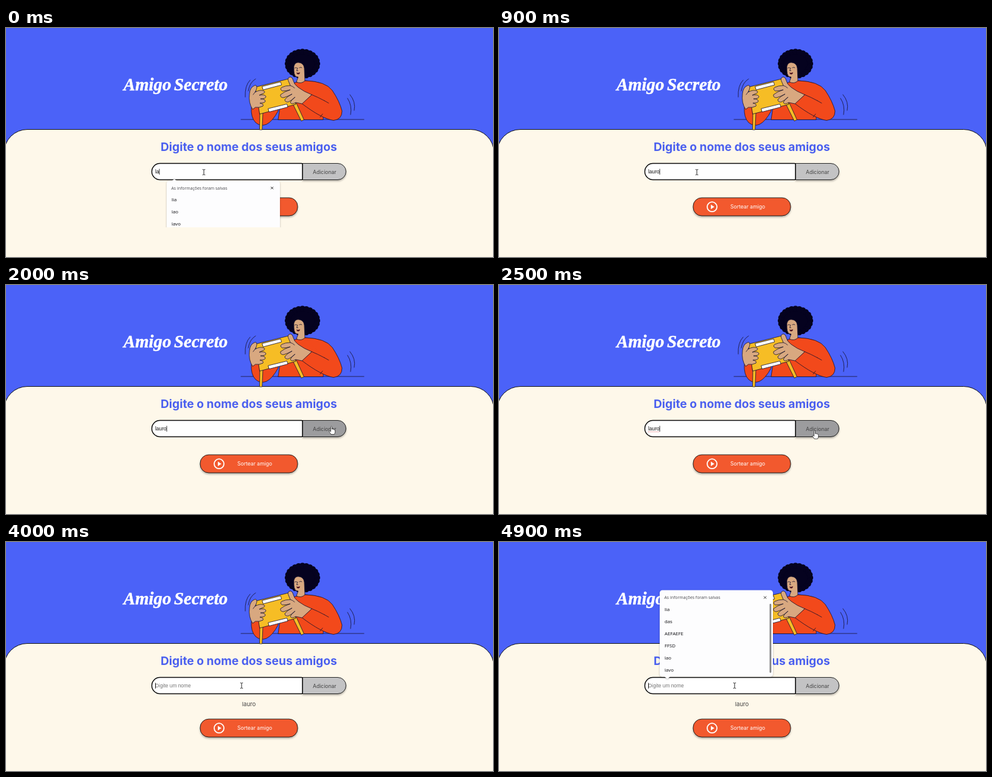
Recreate the animation shown at these times as an HTML page. Size 800 by 378 pixels, loop 5000 ms.

```html
<!DOCTYPE html>
<html lang="pt-BR">
<head>
<meta charset="utf-8">
<title>Amigo Secreto</title>
<style>
  html, body { margin: 0; width: 100%; height: 100%; overflow: hidden; background: #4b62f8; }
  svg { display: block; width: 100vw; height: 100vh; }
  .inter { font-family: Inter, sans-serif; }
  .arial { font-family: "Liberation Sans", Arial, sans-serif; font-size: 8.4px; }
  .menu { font-family: "Open Sans", "Noto Sans", sans-serif; }
  .shadow { filter: drop-shadow(0 2px 1.5px rgba(0, 0, 0, .3)); }
  .float { filter: drop-shadow(0 1px 1.5px rgba(0, 0, 0, .25)); }
  .art { stroke: #17122e; stroke-width: .8; stroke-linecap: round; stroke-linejoin: round; }
  .skin { fill: #d8a880; }
  .cloth { fill: #f2491b; }
  .wood { fill: #f6bd25; }
  .line { fill: none; }
</style>
</head>
<body>
<svg viewBox="0 0 800 378" preserveAspectRatio="none">
  <defs>
    <clipPath id="screen"><rect width="800" height="329"/></clipPath>
  </defs>
  <rect width="800" height="378" fill="#4b62f8"/>
  <text x="193" y="103" fill="#fff" stroke="#fff" stroke-width=".5" font-size="28.8" font-weight="700" font-style="italic" word-spacing="-2.5" font-family="'Liberation Serif', 'Noto Serif', serif">Amigo Secreto</text>

  <rect x="-3" y="167.500" width="804.500" height="260" rx="38" fill="#fef8ea" stroke="#111"/>

  <g class="art">
    <path class="line" d="M386 151H588"/>
    <path class="cloth" d="M403 131Q402 148 410 156Q418 163 428 159Q438 154 447 137V128Z"/>
    <path class="cloth" d="M447 151L452 118Q456 98 475 90L492 87Q520 89 525 96L521 151Z"/>
    <path class="cloth" d="M492 87Q525 88 536 103Q548 121 552 137Q552 151 538 152.500Q519 150 485 124L502 110Q512 114 523 120"/>
    <path class="line" d="M516 147L520 142M523 120L530 124"/>
    <g id="hair" fill="#05021f" stroke="none"><ellipse cx="487" cy="59" rx="27" ry="22.500"/></g>
    <path class="skin" d="M473 63Q475 56 481 57Q489 58 490 66L491 87Q485 93 477 89L480 81Q473 81 473 71Z"/>
    <path class="line" d="M474.500 66Q476 64.500 478 66M482 65.500Q484 64 486 65.500M479 66L477.500 70.500H479.500"/>
    <path d="M477 73.500Q480 74.500 483 73Q482.500 77 479.700 76.500Q477.500 76 477 73.500Z" fill="#4d131f" stroke="none"/>
    <path class="wood" d="M417 139L416.500 168H420.800L422 139Z"/>
    <path class="wood" d="M472 127L485 153.500L489.500 151.500L477 124Z"/>
    <path class="wood" d="M410 97.500L466 83.500L476 126L417 142Z"/>
    <path fill="#fff" d="M421 96.500L451 89L452.700 94L422.700 102ZM431 133L461.500 125.500L463 130.500L432.500 138.500Z"/>
    <path class="skin" d="M405 134Q398 124 400 108Q401 98 408 95Q412 93 412 99Q411 103 409 106Q418 101 424 104Q427 107 420 109L416 111Q425 109 427 113Q427 117 418 117Q426 117 426 121Q425 124 417 124Q424 125 422 129Q416 132 410 131Z"/>
    <path class="skin" d="M502 110Q489 105 480 98Q473 93 472 87Q470 80 466 81Q461 83 465 90L467 95Q459 95 453 98Q449 101 454 104Q460 104 467 102Q457 105 451 110Q450 115 456 115Q463 113 470 109Q462 113 458 118Q458 123 464 122Q470 119 475 114Q468 119 467 123Q469 127 476 123L486 125Z"/>
    <path class="line" d="M467 95Q471 96 474 99M409 106L406 110"/>
    <path class="line" d="M401 86Q392 95 393 114M410 84Q400 90 398 104M565 110Q575 122 572 136M561 116Q569 128 566 143"/>
  </g>

  <text class="inter" x="254" y="202.500" fill="#4b60ef" font-size="19.2" font-weight="700">Digite o nome dos seus amigos</text>

  <path id="add" class="shadow" d="M487 223.500H545A13.500 13.500 0 0 1 545 250.500H487Z" stroke="#111" stroke-width=".9"/>
  <text class="inter" x="504" y="240.500" fill="#444" font-size="8.6">Adicionar</text>
  <path id="field" d="M253 223.500H485.500Q487 223.500 487 225V249Q487 250.500 485.500 250.500H253A13.500 13.500 0 0 1 253 223.500Z" fill="#fff" stroke="#0a0a0a"/>
  <text id="hint" class="arial" x="245" y="240" fill="#757575">Digite um nome</text>
  <text id="typed" class="arial" x="245" y="240" fill="#111"></text>
  <path id="spell" fill="none" stroke="#d33" stroke-width=".8" stroke-dasharray="1 1"/>
  <rect id="caret" y="232.500" width=".8" height="9.500" fill="#000"/>

  <text id="friend" class="inter" x="399" y="270.500" fill="#444" font-size="9.6" text-anchor="middle">lauro</text>
  <g id="draw">
    <rect class="shadow" x="319" y="280.200" width="160" height="29.800" rx="14" fill="#f2592e" stroke="#111" stroke-width=".9"/>
    <circle cx="350" cy="295.200" r="8" fill="none" stroke="#fff" stroke-width="1.800"/>
    <path d="M348 291.500L353.800 295.200L348 298.900Z" fill="#fff"/>
    <text class="inter" x="380" y="298.300" fill="#fff" font-size="8.6">Sortear amigo</text>
  </g>

  <g clip-path="url(#screen)">
    <g id="popup" class="menu">
      <g class="float" fill="#fdfdfe">
        <path id="tip"/>
        <rect id="panel" x="264" width="186" rx="4.500"/>
      </g>
      <g id="content">
        <text x="271.500" y="14.500" fill="#4a4a4e" font-size="6.9">As informações foram salvas</text>
        <path d="M435 10L439.200 14.200M439.200 10L435 14.200" stroke="#222" stroke-width=".9"/>
        <g id="items" fill="#0c0c10" font-size="7.8" font-weight="500"></g>
        <rect id="bar" x="444.500" y="22.500" width="2.800" height="114" rx="1.400" fill="#858585"/>
      </g>
    </g>
  </g>

  <g id="pointer">
    <path id="beam" d="M-2.200 -4.500Q0 -4.500 0 -3.500Q0 -4.500 2.200 -4.500M0 -3.500V3.500M-2.200 4.500Q0 4.500 0 3.500Q0 4.500 2.200 4.500" fill="none" stroke="#222" stroke-width="1"/>
    <path id="arrow" d="M0 0V10L2.400 7.900L4 11.500L5.600 10.800L4 7.300H7.200Z" fill="#fff" stroke="#111" stroke-width=".7"/>
    <path id="hand" d="M-1 1Q0 -.8 1 1V5Q2 4 3 5.200Q4 4.600 4.800 5.800Q6 5.500 6.200 7V10Q5.800 12 4.800 13.500H-.5Q-1.500 11.500 -3.800 8.800Q-3.600 7 -2 8L-1 9Z" fill="#fff" stroke="#111" stroke-width=".7"/>
  </g>
</svg>
<script>
const LOOP = 5000, STEP = 100;
const NS = "http://www.w3.org/2000/svg";
const $ = id => document.getElementById(id);
const set = (id, attrs) => { for (const k in attrs) $(id).setAttribute(k, attrs[k]); };
const show = (id, on) => { $(id).style.display = on ? "" : "none"; };
const add = (parent, tag, attrs) => {
  const el = document.createElementNS(NS, tag);
  for (const k in attrs) el.setAttribute(k, attrs[k]);
  return $(parent).appendChild(el);
};

const TYPED = [[0, "la"], [200, "lau"], [400, "laur"], [600, "lauro"], [3100, ""]];
const FOCUS = [[0, 1], [3000, 0], [3900, 1]];
const CARET = [[0, 1], [1100, 0], [1600, 1], [2100, 0], [2400, 1], [3000, 0], [3900, 1], [4400, 0], [4600, 1]];
const FADE = [[0, 1], [400, .9], [500, .5], [600, 0], [4700, .45], [4800, .85], [4900, 1]];
const MENU = [
  [0, { y: 252, h: 100, items: ["lia", "lao", "lavo"] }],
  [100, { y: 252, h: 66, items: ["lavo", "lara"] }],
  [4700, { y: 79.5, h: 143, items: ["lia", "das", "AEFAEFE", "FFSD", "lao", "lavo"], up: true }]
];
const PATH = [[0, 325, 238], [1200, 325, 238], [1500, 459, 189], [1800, 580, 212], [2100, 518.5, 240.5], [3500, 518.5, 240.5], [3800, 387, 237], [5000, 387, 237]];

const at = (table, t) => table.filter(row => row[0] <= t).pop()[1];
const position = t => {
  const i = PATH.findIndex(p => p[0] > t);
  const [t0, x0, y0] = PATH[i - 1], [t1, x1, y1] = PATH[i];
  const k = (t - t0) / (t1 - t0), e = k * k * (3 - 2 * k);
  return [x0 + (x1 - x0) * e, y0 + (y1 - y0) * e];
};

for (let i = 0; i < 24; i++) {
  const a = i / 24 * Math.PI * 2;
  add("hair", "circle", { cx: 487 + 24.3 * Math.cos(a), cy: 59 + 20 * Math.sin(a), r: 4.8 });
}
const rows = Array.from({ length: 6 }, (_, i) => add("items", "text", { x: 272, y: 34 + i * 20.1 }));

function drawField(t) {
  const text = at(TYPED, t), focus = at(FOCUS, t);
  $("typed").textContent = text;
  const end = 245 + (text ? $("typed").getComputedTextLength() : 0);
  set("field", { "stroke-width": focus ? 1.5 : .8 });
  set("caret", { x: end });
  set("spell", { d: `M245 242.3H${end}` });
  show("hint", !text);
  show("caret", at(CARET, t));
  show("spell", t >= 2400 && text);
}

function drawMenu(t) {
  const fade = at(FADE, t), { y, h, items, up } = at(MENU, t);
  const mid = y + h / 2, s = .95 + .05 * fade;
  show("popup", fade > 0);
  set("popup", { opacity: fade, transform: `translate(357 ${mid}) scale(${s}) translate(-357 ${-mid})` });
  set("panel", { y, height: h });
  set("tip", { d: up ? `M271 ${y + h - 1}H282L276.500 ${y + h + 3.5}Z` : `M271 ${y + 1}H282L276.500 ${y - 2.5}Z` });
  set("content", { transform: `translate(0 ${y})` });
  rows.forEach((row, i) => { row.textContent = items[i] || ""; });
  show("bar", up);
}

function drawPointer(t) {
  const [x, y] = position(t);
  const inRow = y > 223 && y < 251;
  const kind = inRow && x > 239 && x < 487 ? "beam" : inRow && x >= 487 && x < 559 ? "hand" : "arrow";
  set("pointer", { transform: `translate(${x} ${y})` });
  for (const k of ["beam", "arrow", "hand"]) show(k, k === kind);
  set("add", { fill: kind === "hand" ? "#9c9c9e" : "#c3c3c4" });
}

function render(t) {
  drawField(t);
  drawMenu(t);
  drawPointer(t);
  const added = t >= 3100;
  show("friend", added);
  set("draw", { transform: `translate(0 ${added ? 12 : 0})` });
}

let start;
function tick(now) {
  start ??= now;
  render(Math.floor((now - start) % LOOP / STEP) * STEP);
  requestAnimationFrame(tick);
}
render(0);
requestAnimationFrame(tick);
</script>
</body>
</html>
```
